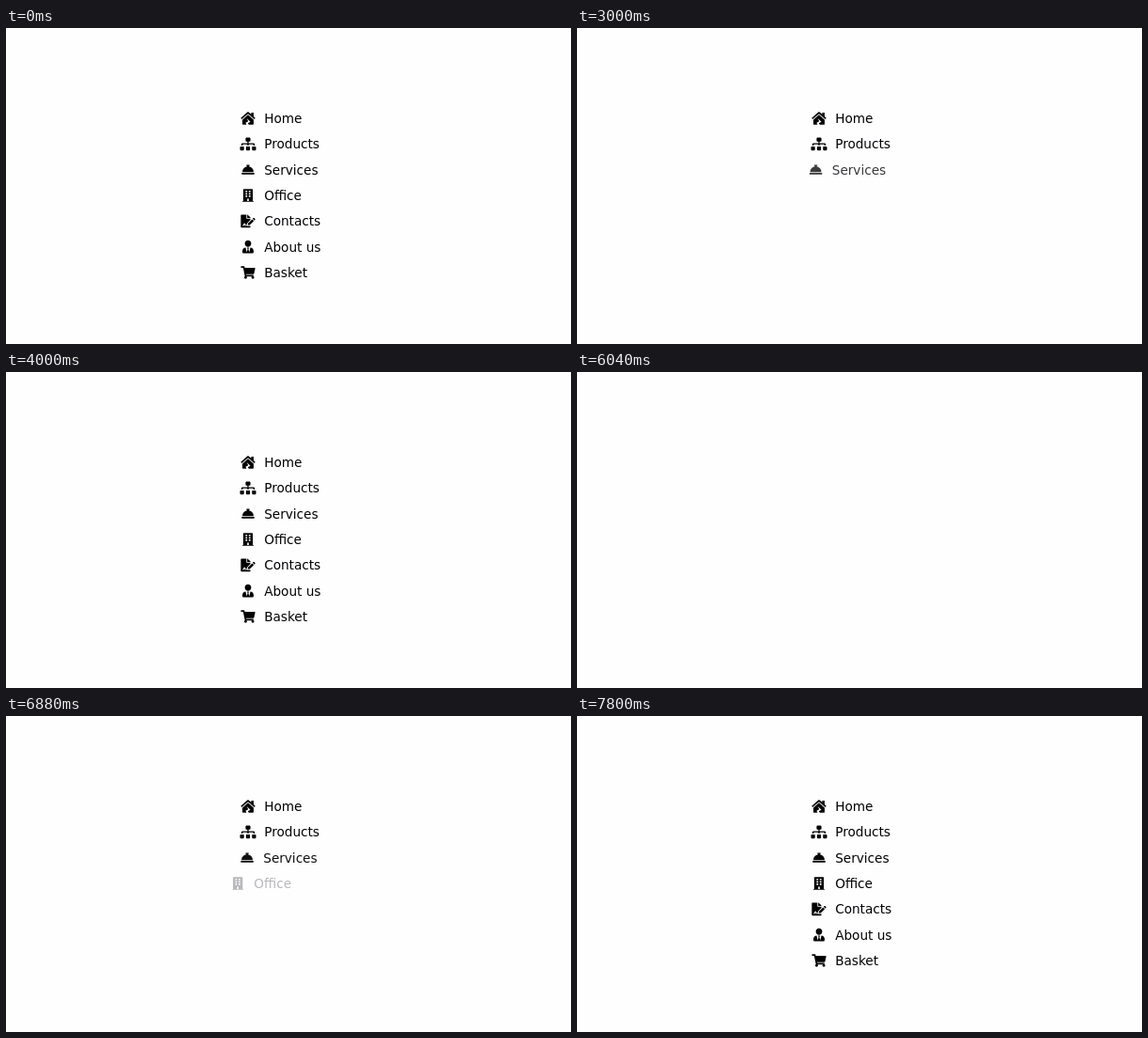
These frames come from a looping animation (600 by 336 pixels, 8360 ms). An HTML page:

```html
<!DOCTYPE html>
<html lang="en">
<head>
<meta charset="utf-8">
<title>Menu</title>
<style>
  html, body { margin: 0; width: 100%; height: 100%; overflow: hidden; background: #fefdff; }
  svg { display: block; width: 600px; height: 336px; }
  text { font: 13.6px "DejaVu Sans", sans-serif; }
</style>
</head>
<body>
<svg id="stage" viewBox="0 0 600 336"></svg>
<script>
const LOOP = 8360, TICK = 40;
const FADE = 400, STAGGER = 200, SHIFT = 15;
// The menu is cleared at `clear`; its first row starts to slide in at `start`.
const RUNS = [{ clear: 2320, start: 2412 }, { clear: 6040, start: 6203 }];

const SIZE = 13.6, TOP = 96, PITCH = 82 / 3, ICON_X = 257, TEXT_X = 274.2;

const box = (x, y, w, h) => `M${x} ${y}h${w}v${h}h${-w}z`;
const node = x => `M${x + 128} 352h-96c-18 0-32 14-32 32v96c0 18 14 32 32 32h96c18 0 32-14 32-32v-96c0-18-14-32-32-32z`;
const panes = [64, 160, 256].map(y => box(128, y, 64, 64) + box(256, y, 64, 64)).join('');

const ROWS = [
  { label: 'Home', width: 576, path:
    'M288 115L69 308l-5 3v185c0 9 7 16 16 16h149l-37-73 104-64-60-119 148 137-104 64 40 55h176c9 0 16-7 16-16V311l-5-3z' +
    'M571 236l-59-52V48c0-9-7-16-16-16h-64c-9 0-16 7-16 16v52L315 10c-15-13-39-13-54 0L5 236c-6 6-7 16-1 23l22 24c5 6 16 7 22 1L277 82c6-6 16-6 22 0l229 202c6 6 17 5 23-1l21-24c6-7 5-17-1-23z' },
  { label: 'Products', width: 640, path:
    node(0) + node(240) + node(480) +
    'M104 272h192v48h48v-48h192v48h48v-58c0-21-17-38-38-38H344v-64h40c18 0 32-14 32-32V32c0-18-14-32-32-32H256c-18 0-32 14-32 32v96c0 18 14 32 32 32h40v64H94c-21 0-38 17-38 38v58h48z' },
  { label: 'Services', width: 512, path:
    'M288 131v-19h16c9 0 16-7 16-16V80c0-9-7-16-16-16h-96c-9 0-16 7-16 16v16c0 9 7 16 16 16h16v19C115 146 32 239 32 352h448c0-113-83-206-192-221z' +
    'M496 384H16c-9 0-16 7-16 16v32c0 9 7 16 16 16h480c9 0 16-7 16-16v-32c0-9-7-16-16-16z' },
  { label: 'Office', width: 448, path:
    'M436 480h-20V24c0-13-11-24-24-24H56C43 0 32 11 32 24v456H12c-7 0-12 5-12 12v20h448v-20c0-7-5-12-12-12z' +
    panes + box(192, 384, 64, 96) },
  { label: 'Contacts', width: 576, path:
    'M218 424c-5-9-15-9-20 0l-8 15c-6 13-25 11-29-2l-17-50-11 31c-6 18-22 30-41 30H80c-21 0-21-32 0-32h12c5 0 9-3 11-8l18-54c7-22 38-22 46 0l14 41c20-16 54-9 66 15 2 3 5 5 9 6v-82l128-127v-47H248c-13 0-24-11-24-24V0H24C11 0 0 11 0 24v464c0 13 11 24 24 24h336c13 0 24-11 24-24v-40H256c-16 0-31-9-38-24z' +
    'M384 122c0-6-2-12-7-17L279 7c-4-4-11-7-17-7h-6v128h128z' +
    'M288 347v69h69l162-163-68-68z' +
    'M569 167l-32-32c-10-10-26-10-36 0l-28 28 68 68 28-28c10-10 10-26 0-36z' },
  { label: 'About us', width: 448, path:
    'M224 256c71 0 128-57 128-128S295 0 224 0 96 57 96 128s57 128 128 128z' +
    'M320 289l-48 191-32-136 32-56h-96l32 56-32 136-48-191C57 292 0 350 0 422v42c0 27 21 48 48 48h352c27 0 48-21 48-48v-42c0-72-57-130-128-133z' },
  { label: 'Basket', width: 576, path:
    'M528 301l47-208C579 78 567 64 552 64H159l-9-45C148 8 138 0 127 0H24C11 0 0 11 0 24v16c0 13 11 24 24 24h70l70 343c-17 10-28 28-28 49 0 31 25 56 56 56s56-25 56-56c0-16-6-30-17-40h210c-11 10-17 24-17 40 0 31 25 56 56 56s56-25 56-56c0-22-13-41-32-50l6-25c3-15-8-29-23-29H218l-6-32h293c11 0 21-8 23-19z' }
];

const stage = document.getElementById('stage');

function add(parent, tag, attrs) {
  const el = document.createElementNS(stage.namespaceURI, tag);
  for (const key in attrs) el.setAttribute(key, attrs[key]);
  return parent.appendChild(el);
}

const slides = ROWS.map((row, i) => {
  const y = TOP + i * PITCH, scale = SIZE / 512;
  const group = add(stage, 'g', {});
  add(group, 'path', {
    d: row.path,
    'fill-rule': 'evenodd',
    transform: `translate(${ICON_X - row.width * scale / 2} ${y - SIZE / 2}) scale(${scale})`
  });
  add(group, 'text', { x: TEXT_X, y: Math.round(y + 5) }).textContent = row.label;
  const slide = group.animate(
    [{ opacity: 0, transform: `translateX(${-SHIFT}px)` }, { opacity: 1, transform: 'translateX(0px)' }],
    { duration: FADE, easing: 'ease', fill: 'both' });
  slide.pause();
  return slide;
});

function show(time) {
  const t = Math.floor(time / TICK) * TICK;
  const run = RUNS.filter(r => t >= r.clear).pop();
  slides.forEach((slide, i) => {
    const age = run ? t - run.start - i * STAGGER : FADE;
    // The faintest first step stays invisible.
    slide.currentTime = age < 30 ? 0 : Math.min(age, FADE);
  });
}

const begin = performance.now();
function frame() {
  show((performance.now() - begin) % LOOP);
  requestAnimationFrame(frame);
}
frame();
</script>
</body>
</html>
```
